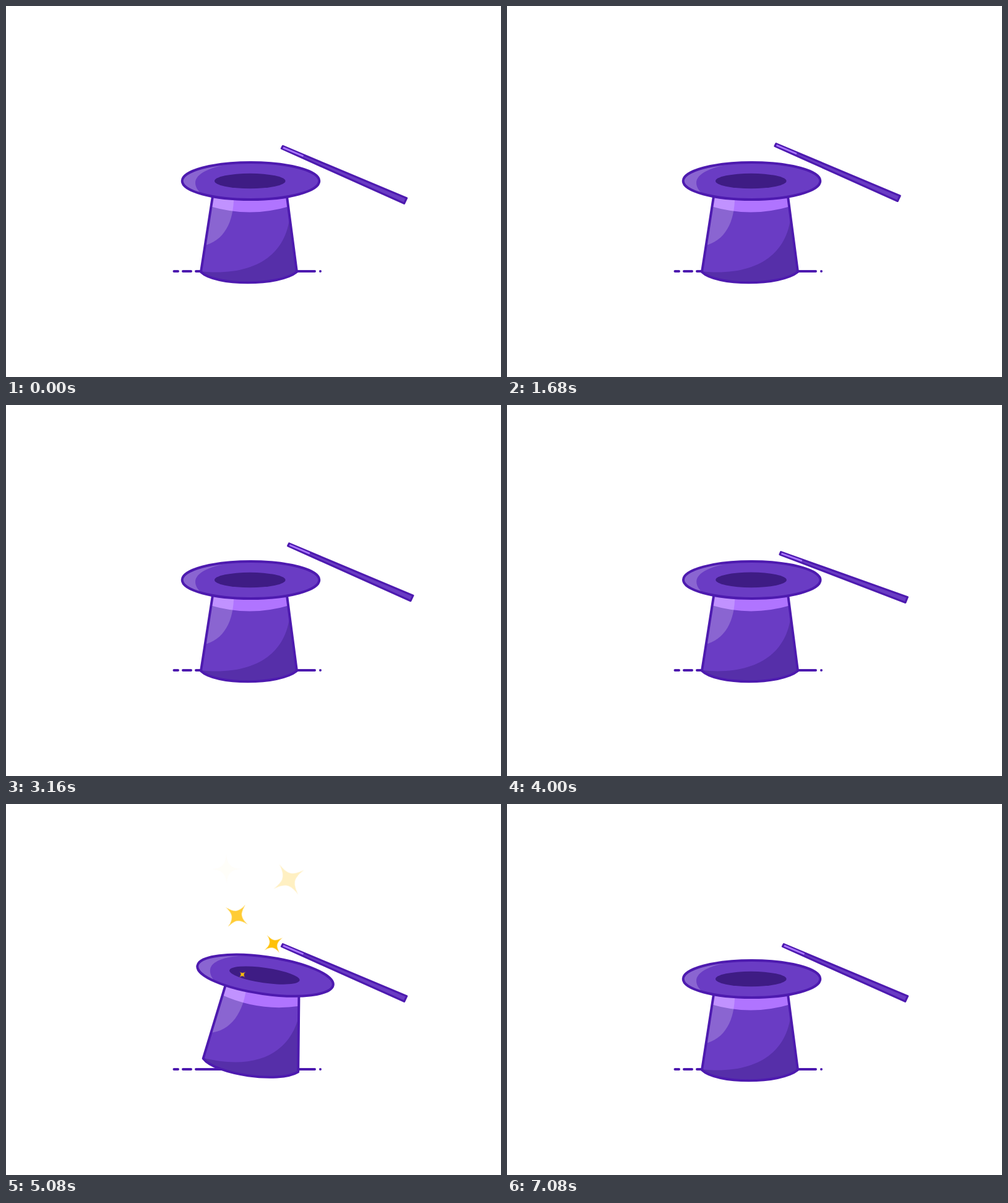
Write an HTML page that moves like this. It is 800x600 px and loops after 7.6 s.

```html
<!DOCTYPE html>
<html lang="en">
<head>
<meta charset="utf-8">
<title>Magic hat</title>
<style>
  @property --phase { syntax: "<number>"; inherits: false; initial-value: 0; }
  @property --tap { syntax: "<number>"; inherits: false; initial-value: 0; }
  @property --tilt { syntax: "<number>"; inherits: false; initial-value: 0; }

  html, body { margin: 0; width: 100%; height: 100%; overflow: hidden; background: #fff; }
  svg { display: block; width: 800px; height: 600px; }

  .line { stroke: #4d1aaf; stroke-width: 4; stroke-linecap: round; stroke-linejoin: round; }
  .main { fill: #6a3cc4; }
  .shine { fill: #fff; fill-opacity: .21; }
  .none { fill: none; }

  /* Two loops along a full-shouldered oval, then a tap around the thick end */
  #wand {
    --sin: sin(var(--phase) * 1deg);
    --cos: cos(var(--phase) * 1deg);
    transform:
      translate(calc(var(--sin) * -42px), calc((var(--cos) - 1) * 64.5px - var(--sin) * var(--sin) * 11px))
      translate(646px, 315px) rotate(calc(var(--tap) * 1deg)) translate(-646px, -315px);
    animation: circle 7.6s linear infinite, tap 7.6s linear infinite;
  }
  @keyframes circle {
    0% { --phase: 0; animation-timing-function: cubic-bezier(.3, .1, .75, .85); }
    10.526% { --phase: 207; }
    21.053% { --phase: 363; }
    22.105% { --phase: 377; }
    31.579% { --phase: 529; }
    33.684% { --phase: 580; }
    42.105% { --phase: 714; animation-timing-function: ease-out; }
    43.158%, 100% { --phase: 720; }
  }
  @keyframes tap {
    0%, 48.947% { --tap: 0; animation-timing-function: ease-in; }
    52.632% { --tap: -3.2; animation-timing-function: ease-out; }
    55.789%, 100% { --tap: 0; }
  }

  /* Rocks on the foot it leans towards; beyond 4 degrees it also slides and lifts */
  #hat {
    --slide: (var(--tilt) - clamp(-4, var(--tilt), 4));
    transform:
      translate(calc(var(--slide) * .6px), calc(max(var(--slide), -1 * var(--slide)) * -.24px))
      translate(440px, 430px) rotate(calc(max(var(--tilt), 0) * 1deg))
      translate(-95px, 0px) rotate(calc(min(var(--tilt), 0) * 1deg))
      translate(-345px, -430px);
    animation: rock 7.6s cubic-bezier(.35, .15, .65, .85) infinite;
  }
  @keyframes rock {
    0% { --tilt: 0; }
    52.632% { --tilt: 0; animation-timing-function: ease-out; }
    55.263% { --tilt: 12; }
    61.974% { --tilt: -10; }
    68.421% { --tilt: 12.2; }
    75.132% { --tilt: -5.7; }
    81.842% { --tilt: 5.8; }
    88.816% { --tilt: -2.4; }
    93.158%, 100% { --tilt: 0; }
  }

  /* Each star lives 880 ms, one every 208 ms, on alternating sides */
  .star {
    fill: #ffc107;
    opacity: 0;
    animation: grow 7.6s linear infinite, var(--side) 7.6s linear infinite;
    animation-delay: calc(4208ms + var(--n) * 208ms);
  }
  .left { --side: left; }
  .right { --side: right; }
  @keyframes grow {
    0% { scale: .12; opacity: 1; }
    .526% { scale: .235; }
    3.263% { scale: .61; }
    5.2% { opacity: 1; }
    6% { scale: .78; opacity: .82; }
    8.737% { scale: 1; opacity: .25; }
    11.579% { scale: .83; opacity: .02; }
    11.58%, 100% { scale: .83; opacity: 0; }
  }
  @keyframes left {
    0% { translate: 383px 285px; rotate: -140deg; }
    6% { translate: 373px 181px; rotate: -52deg; }
    11.579%, 100% { translate: 356px 104px; rotate: 0deg; }
  }
  @keyframes right {
    0% { translate: 414px 284px; rotate: -180deg; }
    3.263% { translate: 432px 226.5px; rotate: -125deg; }
    8.737% { translate: 457px 122px; rotate: -32deg; }
    11.579%, 100% { translate: 475.5px 114px; rotate: 0deg; }
  }
</style>
</head>
<body>
<svg viewBox="0 0 800 600">
  <defs>
    <path id="body" d="M334 308L315 430C338 453 442 453 470 430L454 308Z"/>
    <ellipse id="brim" cx="395.5" cy="283" rx="110.8" ry="30"/>
    <clipPath id="inBody"><use href="#body"/></clipPath>
    <clipPath id="inBrim"><use href="#brim"/></clipPath>
    <path id="spark" d="M0-29C2-8 8-2 29 0C8 2 2 8 0 29C-2 8-8 2-29 0C-8-2-2-8 0-29Z"/>
  </defs>

  <path class="line" d="M271.5 429H278M286 429H299M307 429H499M508 429h.01"/>

  <g id="hat">
    <g clip-path="url(#inBody)">
      <use href="#body" class="main"/>
      <path fill="#562fa9" d="M459 335C455 400 405 439 312 429V460H480V335Z"/>
      <path fill="#b074ff" d="M325 300L330 324Q394 343 458 324L462 300Z"/>
      <path class="shine" d="M368 300C370 345 355 380 318 388L310 300Z"/>
    </g>
    <use href="#body" class="line none"/>
    <use href="#brim" class="main"/>
    <path class="shine" clip-path="url(#inBrim)"
      d="M402 252C342 254 306 268 306 286C306 294 312 302 322 308L270 312V248H402Z"/>
    <use href="#brim" class="line none"/>
    <ellipse cx="394.3" cy="283" rx="57.3" ry="12.3" fill="#3e1c84"/>
  </g>

  <g id="wand">
    <path class="line main" style="stroke-width:3.2" d="M447.3 226.6L647.6 310.8L643.6 319.3L445.4 230.4Z"/>
    <path d="M448 229.1L480.5 242.8" stroke="#a974ff" stroke-width="2.8"/>
  </g>

  <use href="#spark" class="star left" style="--n:0"/>
  <use href="#spark" class="star right" style="--n:1"/>
  <use href="#spark" class="star left" style="--n:2"/>
  <use href="#spark" class="star right" style="--n:3"/>
  <use href="#spark" class="star left" style="--n:4"/>
  <use href="#spark" class="star right" style="--n:5"/>
</svg>
</body>
</html>
```
